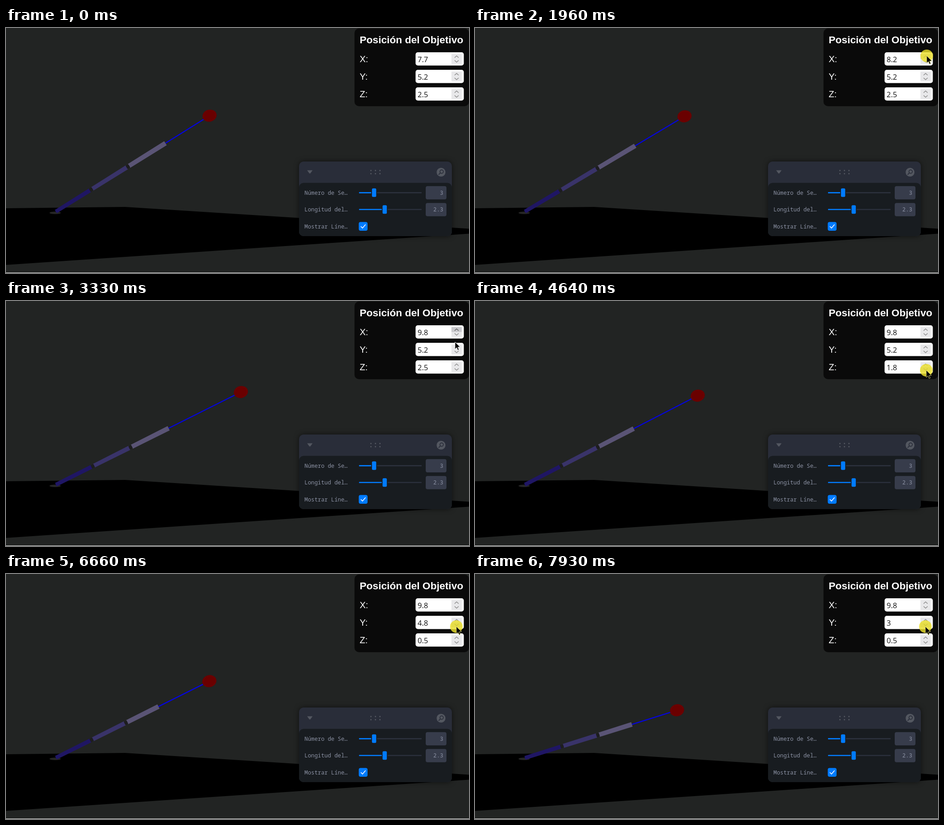
Write an HTML page with a canvas that moves like this. It is 1027 by 545 pixels and loops after 7990 ms.

```html
<!DOCTYPE html>
<html lang="es">
<head>
<meta charset="utf-8">
<title>Brazo robótico</title>
<style>
html, body { margin: 0; width: 100%; height: 100%; overflow: hidden; background: #222423; }
canvas { display: block; }
</style>
</head>
<body>
<canvas id="stage" width="1027" height="545"></canvas>
<script>
const ctx = document.getElementById('stage').getContext('2d');
const LOOP = 7990;
const SANS = '"Liberation Sans", Arial, sans-serif';
const INPUT = '"Open Sans", "Noto Sans", sans-serif';
const MONO = '"Noto Sans Mono", "DejaVu Sans Mono", monospace';
const BASE = { x: 108, y: 410 };
const REACH = 2.3 * 3;

// Pointer legs: [time, x, y], linear between points
const ENTER = [[470, 1016, 2], [700, 996, 12], [900, 977, 36], [1050, 990, 52], [1230, 1002, 62]];
const LOWER = [[3330, 996, 91], [3500, 995, 116], [3700, 999, 148], [3800, 1001, 156], [3920, 1001, 154]];
const RAISE = [[5680, 1001, 154], [5970, 999, 117]];

const clamp = (v, lo, hi) => Math.min(hi, Math.max(lo, v));
const lerp = (a, b, k) => a + (b - a) * k;

function along(keys, t) {
  let i = 1;
  while (i < keys.length - 1 && t > keys[i][0]) i++;
  const [a, b] = [keys[i - 1], keys[i]];
  const k = clamp((t - a[0]) / (b[0] - a[0]), 0, 1);
  return { x: lerp(a[1], b[1], k), y: lerp(a[2], b[2], k) };
}

// Spinner values: one step on the press, then auto-repeat
const ticks = (t, from, period) => Math.floor((t - from) / period);

function valueX(t) {
  if (t < 1430) return 7.7;
  if (t < 1770) return 7.8;
  return Math.min(9.8, 8.2 + 0.1 * ticks(t, 1960, 68));
}
function valueZ(t) {
  if (t < 4060) return 2.5;
  if (t < 4120) return 2.4;
  if (t < 4380) return 2.3;
  return Math.max(0.5, 1.8 - 0.1 * ticks(t, 4640, 69));
}
function valueY(t) {
  if (t < 6170) return 5.2;
  if (t < 6520) return 5.1;
  return Math.max(3, 5 - 0.1 * ticks(t, 6520, 70));
}

function pointer(t) {
  if (t < 140) return null;
  if (t < 270) return { x: 934 - (t - 140) / 50, y: 304 - (t - 140) * 2.5 };
  if (t < 470) return null;
  if (t < 3330) return along(ENTER, t);
  if (t < 5680) return along(LOWER, t);
  return along(RAISE, t);
}

const pressed = t => (t >= 1430 && t < 3050) || (t >= 4060 && t < 5560) || t >= 6170;

// Row and half of the hovered spinner
function hovered(t) {
  if (t >= 1150 && t < 3390) return { row: 0, half: 0 };
  if (t >= 3800 && t < 5780) return { row: 2, half: 1 };
  if (t >= 5960) return { row: 1, half: 1 };
  return { row: -1, half: 0 };
}

function box(x, y, w, h, r, color) {
  ctx.fillStyle = color;
  ctx.beginPath();
  ctx.roundRect(x, y, w, h, r);
  ctx.fill();
}

function poly(points, color) {
  ctx.fillStyle = color;
  ctx.beginPath();
  points.forEach(([x, y]) => ctx.lineTo(x, y));
  ctx.closePath();
  ctx.fill();
}

function line(points, color, width, cap = 'butt') {
  ctx.strokeStyle = color;
  ctx.lineWidth = width;
  ctx.lineCap = cap;
  ctx.beginPath();
  points.forEach(([x, y]) => ctx.lineTo(x, y));
  ctx.stroke();
}

function oval(x, y, rx, ry, color, turn = 0) {
  ctx.fillStyle = color;
  ctx.beginPath();
  ctx.ellipse(x, y, rx, ry, turn, 0, Math.PI * 2);
  ctx.fill();
}

function text(str, x, y, font, color, align = 'left') {
  ctx.font = font;
  ctx.fillStyle = color;
  ctx.textAlign = align;
  ctx.fillText(str, x, y);
}

function drawFloor() {
  ctx.fillStyle = '#222423';
  ctx.fillRect(0, 0, 1027, 545);
  poly([[0, 401], [264, 398], [1027, 446.5], [1027, 457.5], [0, 527]], '#000');
  ctx.fillStyle = '#ececec';
  ctx.fillRect(0, 544, 1027, 1);
}

function project(X, Y, Z) {
  const d = 2.5 - Z, e = 5.2 - Y;
  return {
    x: 451.5 + 33.1 * (X - 7.7) - 40.66 * d + 2.99 * d * d - 1.6 * e,
    y: 195 + 3.57 * (X - 7.7) + 11.8 * d - 0.545 * d * d + 36 * e
  };
}

function drawArm(X, Y, Z) {
  const goal = project(X, Y, Z);
  const dx = goal.x - BASE.x, dy = goal.y - BASE.y;
  const length = Math.hypot(dx, dy);
  const depth = 1 + 0.016 * X + 0.0127 * Y - 0.084 * Z;
  const share = REACH / Math.hypot(X, Y, Z);
  const joint = i => {
    const v = share * i / 3;
    return length * v * depth / (v * depth + 1 - v);
  };

  oval(109, 411.3, 12.5, 2.8, '#252525');
  ctx.save();
  ctx.translate(BASE.x, BASE.y);
  ctx.rotate(Math.atan2(dy, dx));
  line([[3, 0], [length, 0]], '#0404e0', 2.4);
  ['#1f1664', '#393369', '#5a5475'].forEach((color, i) => {
    const start = joint(i) + 3, end = joint(i + 1) - (i < 2 ? 3 : -1);
    const w0 = 8.5 + i * 0.7, w1 = w0 + 0.7;
    poly([[start, -w0 / 2], [end, -w1 / 2], [end, w1 / 2], [start, w0 / 2]], color);
  });
  [1, 2].forEach(i => box(joint(i) - 3.5, -4, 7, 8, 1, '#1d1d1f'));
  ctx.restore();
  oval(goal.x, goal.y, 15.8, 13.3, '#6a0000', -0.25);
}

function drawInput(label, value, row, hover) {
  const y = 54 + row * 39;
  text(label, 784.5, y + 22, `20px ${SANS}`, '#fff');
  box(908.5, y, 107, 29.5, 5, '#fff');
  text(String(+value.toFixed(1)), 913, y + 22, `16.5px ${INPUT}`, '#111');
  box(988, y + 4, 23, 22, 1, '#e8e8ea');
  const over = hover.row === row;
  if (over) box(988, y + 4 + hover.half * 11, 23, 11, 1, '#cacace');
  const tint = half => over && hover.half === half ? '#606060' : '#8b8b8b';
  line([[995, y + 12], [999.5, y + 8], [1004, y + 12]], tint(0), 1.5);
  line([[995, y + 18], [999.5, y + 22], [1004, y + 18]], tint(1), 1.5);
}

function drawTargetPanel(values, hover) {
  box(773, 1, 254, 173, 10, '#0a0a0a');
  text('Posición del Objetivo', 784.5, 34, `bold 22.6px ${SANS}`, '#fff');
  'XYZ'.split('').forEach((axis, i) => drawInput(axis + ':', values[i], i, hover));
}

function drawSlider(y, knob, value) {
  box(783, y - 1.2, 139, 2.6, 1, '#2b303c');
  box(783, y - 1.2, knob - 783, 2.6, 1, '#007bff');
  box(knob - 6.5, y - 11.5, 13, 23, 4, '#181c20');
  box(knob - 4.7, y - 9.5, 9.4, 19, 2.5, '#007bff');
  box(931, y - 14.5, 46, 29.5, 4, '#373c4b');
  text(value, 970, y + 4.5, `12.3px ${MONO}`, '#8c92a4', 'right');
}

function drawControls() {
  const gray = '#535760';
  ctx.save();
  ctx.shadowColor = 'rgba(0,0,0,.55)';
  ctx.shadowBlur = 12;
  box(650, 297, 339, 166, 10, '#292d39');
  ctx.restore();
  box(650, 344.5, 339, 118.5, 10, '#181c20');

  poly([[668, 316.5], [680, 316.5], [675, 323.5], [673, 323.5]], gray);
  for (let i = 0; i < 6; i++) oval(809.5 + i % 3 * 10, 317 + (i > 2 ? 7 : 0), 1.6, 1.6, gray);
  oval(965, 320.8, 9.8, 9.8, gray);
  ctx.strokeStyle = '#292d39';
  ctx.lineWidth = 1.7;
  ctx.beginPath();
  ctx.arc(966.3, 319.5, 3.8, 0, Math.PI * 2);
  ctx.stroke();
  line([[963.4, 322.4], [960, 325.8]], '#292d39', 1.8, 'round');

  ['Número de Se…', 'Longitud del…', 'Mostrar Líne…'].forEach((label, i) =>
    text(label, 662, 370.8 + i * 37.5, `12.3px ${MONO}`, '#8c92a4'));
  drawSlider(366.3, 816.5, '3');
  drawSlider(403.7, 840, '2.3');
  box(782.5, 431.5, 19.5, 19.5, 4, '#007bff');
  line([[787.5, 441.7], [790.8, 445], [797.2, 437.5]], '#fff', 1.6, 'round');
}

function drawPointer(t) {
  const p = pointer(t);
  if (!p) return;
  if (pressed(t)) oval(p.x, p.y, 14, 14, 'rgba(236,224,44,.82)');
  ctx.save();
  ctx.translate(p.x - 5, p.y);
  ctx.translate(0, 0);
  const shape = [[0, 0], [0, 16], [3.7, 12.6], [6.2, 18.4], [8.8, 17.3], [6.3, 11.6], [11.3, 11.4]];
  ctx.translate(5, 0);
  poly(shape, '#000');
  ctx.lineJoin = 'round';
  line([...shape, [0, 0]], pressed(t) ? '#d9d27a' : '#fff', 0.9);
  ctx.restore();
}

function render(t) {
  const values = [valueX(t), valueY(t), valueZ(t)];
  const lag = t >= 1770 && t < 3080 ? 0.1 : 0;
  drawFloor();
  drawArm(values[0] - lag, values[1], values[2]);
  drawTargetPanel(values, hovered(t));
  drawControls();
  drawPointer(t);
}

const begin = performance.now();
function tick() {
  render((performance.now() - begin) % LOOP);
  requestAnimationFrame(tick);
}
tick();
</script>
</body>
</html>
```
